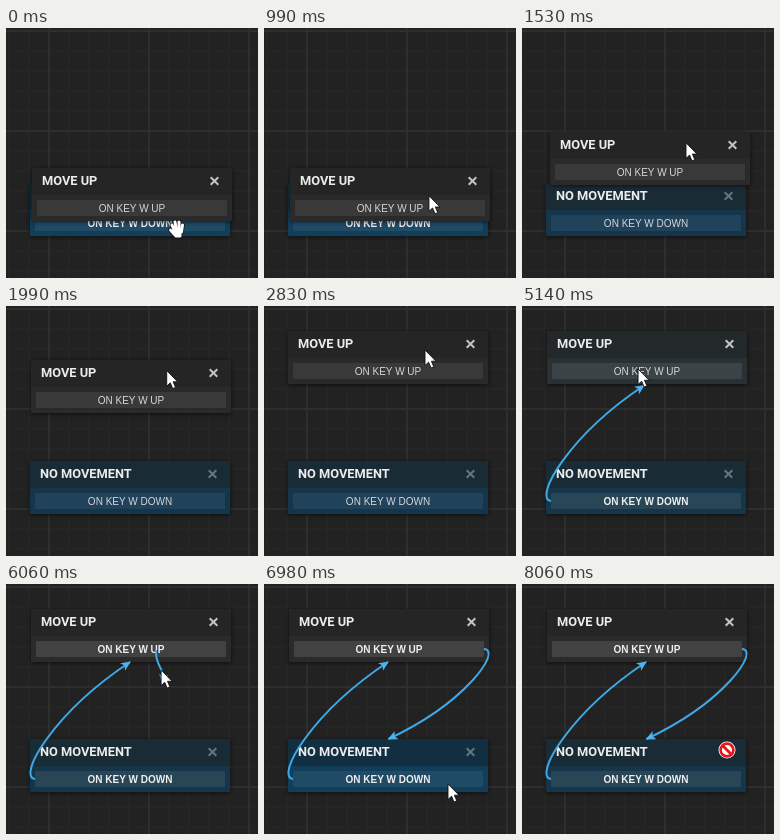
These frames come from a looping animation (252x250 px, 8140 ms). An HTML page:

```html
<!DOCTYPE html>
<html lang="en">
<head>
<meta charset="utf-8">
<title>Linking state nodes</title>
<style>
  html, body { margin: 0; width: 100%; height: 100%; overflow: hidden; background: #222; }
  svg { display: block; width: 100vw; height: 100vh; }
  .title { font: 700 12.8px Roboto, "Open Sans", sans-serif; fill: #ececec; }
  .label { font: 10px "Liberation Sans", Arial, sans-serif; text-anchor: middle; fill: #d6d6d6; }
  .label.linked { font-weight: 700; fill: #eee; }
  .card { filter: drop-shadow(0 1px 2px rgba(0, 0, 0, .6)); }
  .cross { stroke-width: 2; fill: none; }
  .link { fill: none; stroke: #3fa9e8; stroke-width: 2; }
  .head { fill: #4fb4ee; }
</style>
</head>
<body>
<svg viewBox="0 0 252 250">
  <defs>
    <pattern id="grid" x="42" y="2" width="100" height="100" patternUnits="userSpaceOnUse">
      <rect width="100" height="100" fill="#222"/>
      <path d="M21 0V100M41 0V100M61 0V100M81 0V100M0 21H100M0 41H100M0 61H100M0 81H100" stroke="#252525" stroke-width="2"/>
      <path d="M1 0V100M0 1H100" stroke="#2e2e2e" stroke-width="2"/>
    </pattern>
    <path id="fingers" d="M-5 -4L-2 3M-2 -7L-.5 2M2 -7V2M5.5 -4L4.5 3M-6.5 1L-2 6M-1 2V7H3V2Z"
      stroke-linecap="round" stroke-linejoin="round"/>
  </defs>
  <rect width="252" height="250" fill="url(#grid)"/>
  <g id="cards"></g>
  <g id="links"></g>
  <g id="arrow">
    <path d="M0 0V15.5L3.6 12.2L6 18L8.8 16.8L6.4 11.2H11Z" fill="#fff" stroke="#111" stroke-width=".9"/>
  </g>
  <g id="hand">
    <use href="#fingers" stroke="#111" stroke-width="4.6"/>
    <use href="#fingers" stroke="#fff" fill="#fff" stroke-width="3"/>
  </g>
  <g id="denied">
    <circle r="8.5" fill="#fff"/>
    <circle r="6.4" fill="#fff" stroke="#e6141b" stroke-width="2.6"/>
    <path d="M-4.5 -4.5L4.5 4.5" stroke="#e6141b" stroke-width="2.8"/>
  </g>
</svg>
<script>
const LOOP = 8140;
const NS = 'http://www.w3.org/2000/svg';
const $ = id => document.getElementById(id);

function add(parent, tag, attrs, text) {
  const el = document.createElementNS(NS, tag);
  set(el, attrs);
  if (text) el.textContent = text;
  return parent.appendChild(el);
}

function set(el, attrs) {
  for (const key in attrs) el.setAttribute(key, attrs[key]);
}

function makeCard(title, label, crossColor) {
  const root = add($('cards'), 'g', { class: 'card' });
  const body = add(root, 'rect', { width: 200, height: 53, rx: 1 });
  const header = add(root, 'rect', { width: 200, height: 27, rx: 1 });
  const button = add(root, 'rect', { x: 5, y: 32, width: 190, height: 16, rx: 1 });
  add(root, 'text', { class: 'title', x: 10, y: 17 }, title);
  const text = add(root, 'text', { class: 'label', x: 100, y: 44 }, label);
  add(root, 'path', { class: 'cross', stroke: crossColor, d: 'M178.7 9.2L186.3 16.8M186.3 9.2L178.7 16.8' });
  return { root, body, header, button, text };
}

function makeLink() {
  const root = add($('links'), 'g', {});
  return {
    root,
    line: add(root, 'path', { class: 'link' }),
    head: add(root, 'path', { class: 'head', d: 'M1 0L-9 -4.5L-6.5 0L-9 4.5Z' })
  };
}

const idle = makeCard('NO MOVEMENT', 'ON KEY W DOWN', '#64767f');
const move = makeCard('MOVE UP', 'ON KEY W UP', '#c4c4c4');
const upLink = makeLink();
const downLink = makeLink();

// Pointer path: time, x, y
const pointerPath = [
  [0, 171, 200], [220, 171, 200], [450, 176, 211], [700, 172, 209], [990, 165, 168],
  [1070, 162, 151], [1530, 164, 115], [1840, 161, 76], [2370, 160, 36], [2600, 160, 36],
  [2830, 161, 44], [3070, 161, 45], [3450, 92, 211], [3600, 92, 211], [3680, 88, 195],
  [3830, 88, 195], [4220, 104, 124], [4600, 118, 66], [4680, 116, 63], [5140, 116, 63],
  [5680, 150, 66], [5980, 150, 66], [6520, 184, 200], [7370, 184, 200], [7600, 202, 162],
  [LOOP, 202, 162]
];

function pointAt(t) {
  const i = Math.max(1, pointerPath.findIndex(p => p[0] > t));
  const [t0, x0, y0] = pointerPath[i - 1];
  const [t1, x1, y1] = pointerPath[i];
  const k = (t - t0) / (t1 - t0);
  return [x0 + (x1 - x0) * k, y0 + (y1 - y0) * k];
}

const within = (t, from, to) => t >= from && t < to;
const show = (el, visible) => set(el, { visibility: visible ? 'visible' : 'hidden' });
const place = (el, x, y) => set(el, { transform: `translate(${x} ${y})` });

function paint(card, [header, body, button], linked) {
  set(card.header, { fill: header });
  set(card.body, { fill: body });
  set(card.button, { fill: button });
  card.text.classList.toggle('linked', linked);
}

function drawLink(link, points) {
  show(link.root, !!points);
  if (!points) return;
  const [a, b, c, d] = points;
  const angle = Math.atan2(d[1] - c[1], d[0] - c[0]) * 180 / Math.PI;
  set(link.line, { d: `M${a}C${b} ${c} ${d}` });
  set(link.head, { transform: `translate(${d}) rotate(${angle})` });
}

// A loose link leaves the button vertically and trails the pointer.
function looseLink([x, y], [px, py]) {
  const end = [px + 1, py + 13];
  const bend = (end[1] - y) * .52;
  return [[x, y], [x - 1, y + bend], [end[0] + 3, end[1] - bend], end];
}

function upPoints(t, pointer) {
  if (t < 3830) return null;
  if (t < 4450) return looseLink([87, 194], pointer);
  const end = t < 5220 ? [122, 79.5] : [124, 78];
  return [[29, 195], [11, 193], [46, 130], end];
}

function downPoints(t, pointer) {
  if (t < 5980) return null;
  if (t < 6980) return looseLink([150, 66], pointer);
  return [[220, 65], [238, 66], [203, 118], [124.5, 155]];
}

function idleColors(t) {
  if (t < 1070 || within(t, 3830, 4600) || within(t, 6450, 7060)) return ['#112f40', '#103e5b', '#214a65'];
  if (within(t, 3600, 3830)) return ['#192c36', '#15374a', '#2c5069'];
  return ['#192c35', '#15364a', t < 3600 ? '#20425a' : '#284655'];
}

function moveColors(t) {
  if (within(t, 4520, 5220)) return ['#23292b', '#293134', '#3a4346'];
  return ['#252525', '#2a2a2a', t < 5220 ? '#393939' : '#424242'];
}

function draw(t) {
  const pointer = pointAt(t);
  const [x, y] = pointer;

  let spot = [25, 25];
  if (t < 1070) spot = [26, 140];
  else if (t < 2370) spot = [Math.round(x - 136), Math.round(y - 11)];
  else if (t < 2910) spot = [24, 25];
  place(move.root, ...spot);
  place(idle.root, 24, 155);

  paint(move, moveColors(t), t >= 5220);
  paint(idle, idleColors(t), t < 1070 || t >= 3600);
  drawLink(upLink, upPoints(t, pointer));
  drawLink(downLink, downPoints(t, pointer));

  const denied = t >= 7830;
  const hand = t < 990 || within(t, 3600, 3830) || within(t, 5400, 5980);
  show($('hand'), hand);
  show($('denied'), denied);
  show($('arrow'), !hand && !denied);
  place($('hand'), x, y + 1);
  place($('arrow'), x, y);
  place($('denied'), 205, 166);
}

const start = performance.now();
function tick() {
  draw((performance.now() - start) % LOOP);
  requestAnimationFrame(tick);
}
tick();
</script>
</body>
</html>
```
